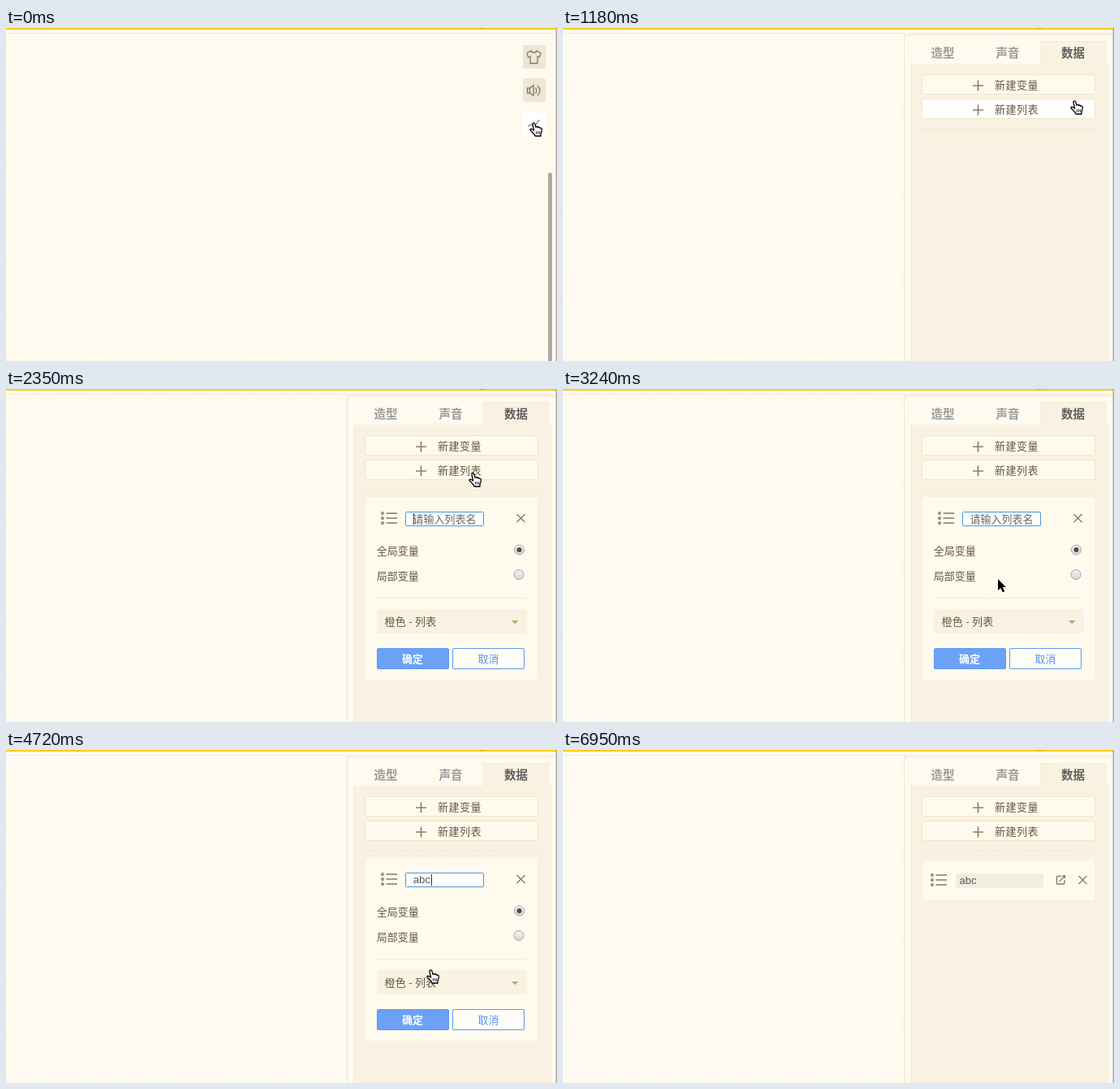
Write an HTML page that moves like this. It is 679 px wide and 410 px high and loops after 7.25 s.

```html
<!DOCTYPE html>
<html lang="zh">
<head>
<meta charset="utf-8">
<title>新建列表</title>
<style>
html, body { margin: 0; width: 100%; height: 100%; overflow: hidden; background: #fffaef; }
svg { display: block; }
text { font: 13px "Noto Sans CJK SC", "Noto Sans CJK", sans-serif; fill: #665741; }
.mid { text-anchor: middle; }
.tab { font-size: 14.5px; font-weight: 700; fill: #999; }
.latin { font-family: "Liberation Sans", Arial, sans-serif; fill: #555; }
.line { fill: none; stroke: #857862; stroke-width: 1.3; }
.box { fill: #fffaee; stroke: #f2e6c6; }
.dash { stroke: #f1e4c2; stroke-dasharray: 3 2; }
</style>
</head>
<body>
<svg width="679" height="410" viewBox="0 0 679 410">
  <defs>
    <pattern id="dots" width="9" height="9" patternUnits="userSpaceOnUse">
      <rect x="3" y="4" width="1" height="1" fill="#f6eddb"/>
    </pattern>
    <linearGradient id="knob" x2="0" y2="1">
      <stop stop-color="#f4f4f4"/><stop offset="1" stop-color="#d6d6d6"/>
    </linearGradient>
    <g id="list" class="line">
      <path d="M6.5 -6H20M6.5 0H20M6.5 6H20" stroke-width="1.6"/>
      <circle cx="2" cy="-6" r="1.3"/><circle cx="2" r="1.3"/><circle cx="2" cy="6" r="1.3"/>
    </g>
    <path id="cross" class="line" d="M-5 -5L5 5M5 -5L-5 5"/>
    <path id="plus" d="M-6.5 0H6.5M0 -6.5V6.5" stroke="#8d8068" stroke-width="1.7"/>
    <circle id="radio" r="6" fill="url(#knob)" stroke="#a5a5a5"/>
  </defs>

  <rect width="679" height="410" fill="#fffaef"/>
  <rect y="8" width="677" height="402" fill="url(#dots)"/>
  <rect width="677" height="7" fill="#fffdf7"/>
  <rect width="679" height="2" fill="#fccb0b"/>
  <rect x="585" width="5" height="1" fill="#e0a41c"/>
  <rect y="6" width="677" height="1" fill="#efe8da"/>

  <g id="tools">
    <rect x="637" y="21" width="28" height="29" rx="2" fill="#eee6d6"/>
    <rect x="637" y="62" width="28" height="29" rx="2" fill="#eee6d6"/>
    <rect x="637" y="104" width="28" height="29" rx="2" fill="#fff"/>
    <path class="line" d="M647 28C648 31 653 31 654 28L659 31L657.500 36L655 35V43.500H646V35L643.500 36L642 31Z"/>
    <path class="line" d="M642.500 74H645.500L650 70.500V83.500L645.500 80H642.500ZM645.500 74V80M652.500 73.500Q655 77 652.500 80.500M655 71Q661 77 655 83"/>
    <path class="line" d="M643 121L647 119L651 122L657 113"/>
    <rect x="668" y="178" width="5" height="240" rx="2.500" fill="#aeaaa4"/>
  </g>

  <g id="panel">
    <rect x="420.500" y="8.500" width="257" height="410" fill="#fefaf0" stroke="#f0e4c1"/>
    <rect x="428" y="44" width="243" height="366" fill="#f9f2e2"/>
    <path d="M588.500 44V16.500H668.500V44" fill="#f9f2e2" stroke="#f4ebd5"/>
    <path d="M428.500 410V44M671.500 410V44" stroke="#f5ecd6"/>
    <text class="tab mid" x="468" y="36.300">造型</text>
    <text class="tab mid" x="548" y="36.300">声音</text>
    <text class="tab mid" x="628.500" y="36.300" style="fill:#5f5f5f">数据</text>
    <rect class="box" x="442.500" y="57.500" width="213" height="24" rx="1.500"/>
    <rect class="box" id="addList" x="442.500" y="87.500" width="213" height="24" rx="1.500"/>
    <use href="#plus" x="511.500" y="71"/>
    <use href="#plus" x="511.500" y="101"/>
    <text x="532" y="75.300" letter-spacing=".5">新建变量</text>
    <text x="532" y="105.300" letter-spacing=".5">新建列表</text>
    <path class="dash" d="M443 124.500H656"/>
  </g>

  <g id="form">
    <rect x="443" y="133" width="212" height="225" rx="2" fill="#fffaee"/>
    <use href="#list" x="462" y="159"/>
    <rect x="492.500" y="151.500" width="96" height="17" rx="1" fill="#fff" stroke="#4596dd"/>
    <text id="hint" x="501.500" y="164.500" style="fill:#666">请输入列表名</text>
    <text id="typed" class="latin" x="501.700" y="164" style="font-size:13.300px"></text>
    <rect id="caret" y="153" width="1" height="14" fill="#333"/>
    <use href="#cross" x="634.500" y="159"/>
    <text x="456.800" y="204.300">全局变量</text>
    <text x="456.800" y="235.300">局部变量</text>
    <use href="#radio" x="632.500" y="198"/>
    <circle cx="632.500" cy="198" r="3" fill="#4a4a4a"/>
    <use href="#radio" x="632" y="228.500"/>
    <path class="dash" d="M457 257.500H642"/>
    <rect x="457" y="271" width="185" height="30" rx="2" fill="#f9f2e2"/>
    <text x="466.500" y="290.500" letter-spacing=".25">橙色 - 列表</text>
    <path d="M623 285H631.500L627.250 289.300Z" fill="#c6a36c"/>
    <rect x="457.500" y="319.500" width="88" height="25" rx="1.500" fill="#6ba1f8" stroke="#5f97ef"/>
    <rect x="550.500" y="319.500" width="88" height="25" rx="1.500" fill="#fffdf8" stroke="#6097ee"/>
    <text class="mid" x="501" y="337.300" font-weight="700" style="fill:#fff;font-weight:700">确定</text>
    <text class="mid" x="594.500" y="337.300" style="fill:#5b94f2;font-weight:500">取消</text>
  </g>

  <g id="item">
    <rect x="442.500" y="135.500" width="213" height="50" rx="2" fill="#fffaee" stroke="#f7eedb"/>
    <use href="#list" x="453" y="160"/>
    <rect x="484" y="152" width="108" height="18" rx="1" fill="#f0eee1"/>
    <text class="latin" x="488.600" y="165">abc</text>
    <path class="line" d="M614 155.500H609.500Q608.500 155.500 608.500 156.500V164Q608.500 165 609.500 165H617Q618 165 618 164V160M611.500 162L618.500 155M615.500 155H618.500V158"/>
    <use href="#cross" x="640.500" y="160"/>
  </g>

  <rect x="677" width="2" height="410" fill="#aaa79f"/>
  <rect x="677" width="1" height="410" fill="#d6d2c8"/>
  <rect x="677" width="2" height="2" fill="#d9b431"/>

  <g id="arrow">
    <path d="M0 0V14L3.300 11L5.700 16.300L8.200 15.200L5.900 10H10Z" stroke="#fff" stroke-width="2" paint-order="stroke"/>
  </g>
  <g id="hand">
    <path d="M4 2.600C3.600 .6 6.200 .1 6.800 2L8 6.200C8.600 5 10.200 5.200 10.500 6.500C11.300 5.600 12.700 6 13 7.300C14.200 6.700 15.300 7.400 15.300 8.800C15.300 11.500 14.900 12.800 14 14.300V17H7.200C6.500 15 4.900 13.500 3.300 11.900C2.200 10.800 .4 9.400 1 8.500C1.700 7.500 3.500 8.400 5.600 10Z" fill="#fff" stroke="#000" stroke-width="1.300" stroke-linejoin="round"/>
    <path d="M8.500 11.200V14.500M10.600 11.200V14.500M12.600 11.200V14.500" stroke="#000" stroke-width=".9"/>
  </g>
</svg>
<script>
const LOOP = 7250;
const $ = id => document.getElementById(id);

// time, x, y, pointer shape
const moves = [
  [0, 645, 116, 'hand'], [150, 646, 116, 'hand'], [290, 650.5, 116, 'arrow'],
  [440, 650.5, 115, 'arrow'], [590, 649, 113, 'arrow'], [740, 646, 108, 'hand'],
  [890, 641, 102, 'hand'], [1030, 634, 95, 'hand'], [1180, 625, 89, 'hand'],
  [1330, 614, 85, 'arrow'], [1480, 601, 83, 'arrow'], [1630, 587, 87, 'hand'],
  [1770, 574, 90, 'hand'], [1920, 568, 92, 'hand'], [2060, 568, 95, 'hand'],
  [2210, 569, 99, 'hand'], [2350, 570, 103, 'hand'],
  [2650, 574, 116, 'arrow'], [2800, 568, 146, 'arrow'], [2950, 556, 182, 'arrow'],
  [3090, 545, 213, 'arrow'], [3240, 536, 234, 'arrow'], [3390, 531, 248, 'arrow'],
  [3530, 526, 258, 'arrow'], [3680, 523, 264, 'arrow'],
  [4720, 518, 270, 'hand'], [4860, 517, 279, 'hand'], [5010, 515, 295, 'arrow'],
  [5160, 511, 316, 'hand'], [5310, 507, 326, 'hand'], [5460, 511.5, 326.5, 'arrow'],
  [6510, 518, 340, 'arrow'], [6660, 532, 364, 'arrow'], [6810, 550, 396, 'arrow'],
  [6950, 0, 0, 'none']
];
const scenes = [[0, 'tools'], [150, 'panel'], [2210, 'form'], [5460, 'item']];
const typing = [[0, ''], [4280, 'a'], [4430, 'ab'], [4570, 'abc']];
const carets = [[0, true], [2800, false], [3390, true], [3830, false], [4280, true], [5010, false]];
const caretX = [502, 509, 516, 524];

const at = (table, t) => table.findLast(row => row[0] <= t);
const show = (id, on) => $(id).setAttribute('visibility', on ? 'visible' : 'hidden');

function draw(t) {
  const scene = at(scenes, t)[1];
  const word = at(typing, t)[1];
  const [, x, y, shape] = at(moves, t);

  show('tools', scene === 'tools');
  show('panel', scene !== 'tools');
  show('form', scene === 'form');
  show('item', scene === 'item');
  show('hint', scene === 'form' && !word);
  show('caret', scene === 'form' && at(carets, t)[1]);
  $('typed').textContent = word;
  $('caret').setAttribute('x', caretX[word.length]);

  const hover = scene === 'panel' && shape === 'hand' && t >= 740;
  $('addList').style.fill = hover ? '#fff' : '';

  for (const id of ['arrow', 'hand']) show(id, shape === id);
  if (shape !== 'none') $(shape).setAttribute('transform', `translate(${x} ${y})`);
}

const start = performance.now();
function tick() {
  draw((performance.now() - start) % LOOP);
  requestAnimationFrame(tick);
}
tick();
</script>
</body>
</html>
```
